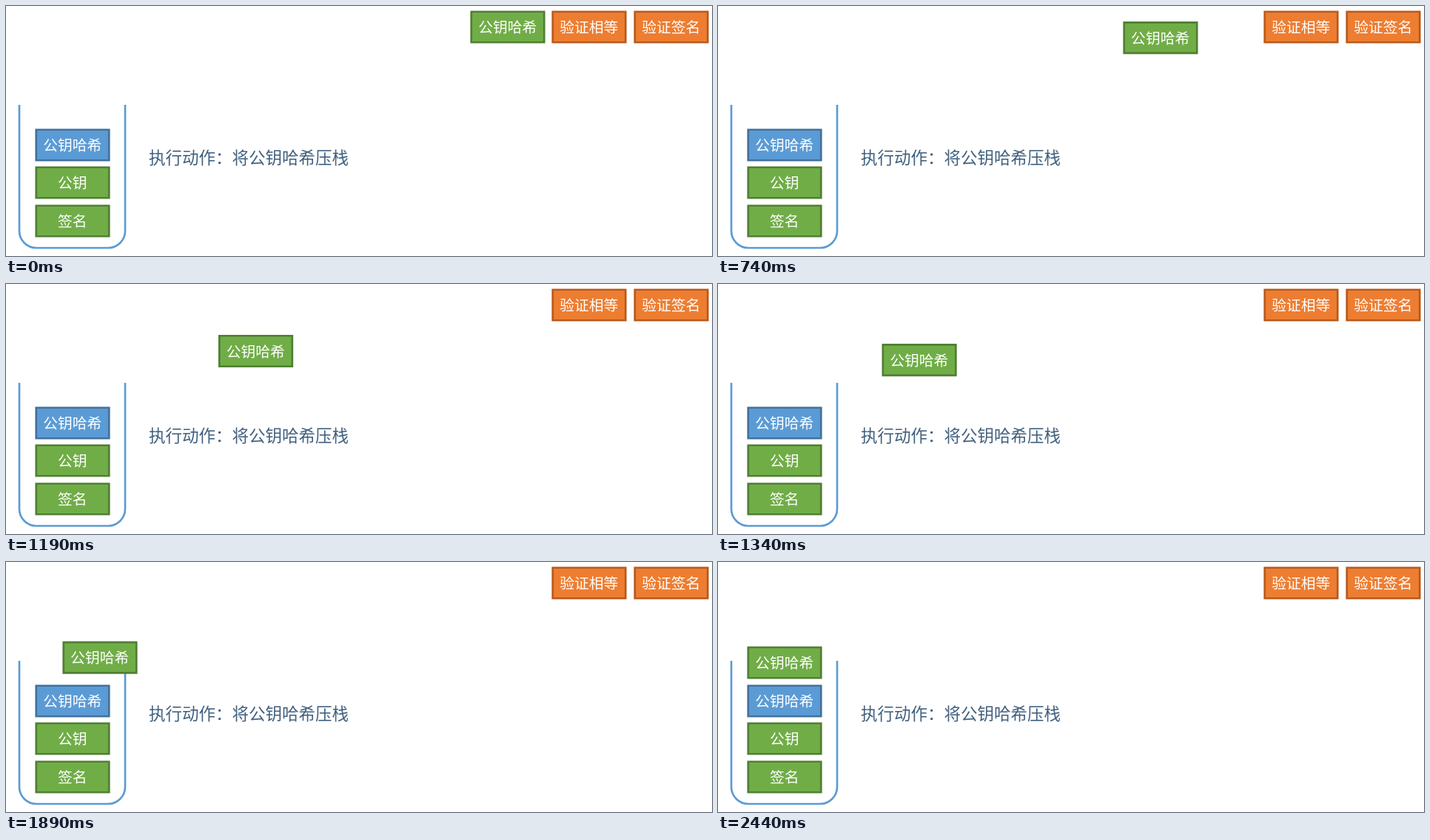
These frames come from a looping animation (954 px wide and 339 px high, 3720 ms). An HTML page with a canvas:

```html
<!DOCTYPE html>
<html lang="zh">
<meta charset="utf-8">
<style>
  html, body { margin: 0; width: 100%; height: 100%; overflow: hidden; background: #fff; }
  canvas { display: block; width: 954px; height: 339px; }
</style>
<canvas width="954" height="339"></canvas>
<script>
const ctx = document.querySelector('canvas').getContext('2d');
const FONT = '"Noto Sans CJK SC", "Noto Sans CJK", sans-serif';
const GREEN = ['#70ad47', '#507e32'], BLUE = ['#5b9bd5', '#41719c'], ORANGE = ['#ed7d31', '#b8591b'];
const LOOP = 3720, MOVE_START = 448, TICK = 79.2, TICKS = 26;
const START = { x: 627, y: 6 }, END = { x: 39, y: 114 };

function write(text, x, y, size, color, align) {
  ctx.font = `300 ${size}px ${FONT}`;
  ctx.textAlign = align;
  ctx.fillStyle = color;
  ctx.fillText(text, x, y);
}

function card(text, x, y, [fill, edge]) {
  ctx.beginPath();
  ctx.rect(x + 1.75, y + 1.75, 98.5, 41.5);
  ctx.fillStyle = fill;
  ctx.fill();
  ctx.strokeStyle = edge;
  ctx.stroke();
  write(text, x + 50.7, y + 30, 19.8, '#fff', 'center');
}

// Short acceleration, then a long slowdown
function ease(u) {
  return u < 0.16 ? 5.75 * u * u : 1 - 1.286 * (1 - u) ** 2.3;
}

// The card advances in even ticks
function progressAt(t) {
  const tick = Math.floor((t - MOVE_START) / TICK) + 1;
  return ease(Math.min(Math.max(tick / TICKS, 0), 1));
}

function draw(t) {
  ctx.clearRect(0, 0, 954, 339);
  ctx.lineWidth = 2.67;
  ctx.strokeStyle = BLUE[0];
  ctx.stroke(new Path2D('M18 134V305A23 23 0 0 0 41 328H138A23 23 0 0 0 161 305V134'));

  card('公钥哈希', 39, 166, BLUE);
  card('公钥', 39, 217, GREEN);
  card('签名', 39, 269, GREEN);
  card('验证相等', 737, 6, ORANGE);
  card('验证签名', 848, 6, ORANGE);
  write('执行动作：将公钥哈希压栈', 193, 214, 22.5, '#41607f', 'left');

  const p = progressAt(t);
  card('公钥哈希', START.x + (END.x - START.x) * p, START.y + (END.y - START.y) * p, GREEN);
}

const begin = performance.now();
function frame() {
  draw((performance.now() - begin) % LOOP);
  requestAnimationFrame(frame);
}
frame();
</script>
</html>
```
